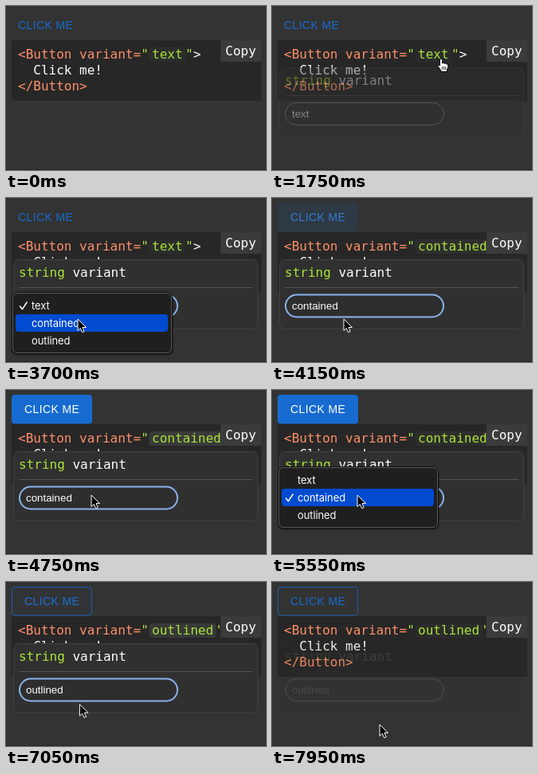
Write an HTML page that moves like this. It is 326 px wide and 206 px high and loops after 8000 ms.

```html
<!DOCTYPE html>
<html lang="en">
<head>
<meta charset="utf-8">
<title>Button playground</title>
<style>
  html, body { margin: 0; width: 100%; height: 100%; overflow: hidden; background: #333; }
  svg { display: block; }
  text { white-space: pre; }
  .mono { font: 16px "DejaVu Sans Mono", monospace; fill: #fff; }
  .tag { fill: #ff9068; }
  .str { fill: #abe338; }
  .label { font: 14px "Liberation Sans", Arial, sans-serif; letter-spacing: .4px; }
  .field { font: 13.33px "Liberation Sans", Arial, sans-serif; fill: #fff; }
  .menu text { font: 13px Inter, sans-serif; letter-spacing: -.1px; fill: #fff; }
</style>
</head>
<body>
<svg width="326" height="206" viewBox="0 0 326 206">
  <rect width="326" height="206" fill="#333"/>
  <rect y="205" width="326" height="1" fill="#262626"/>

  <rect id="btnShadow" x="7" y="8" width="101" height="36" rx="4" fill="#000"/>
  <rect id="btn" x="7" y="6" width="101" height="36.5" rx="4"/>
  <rect id="btnLine" x="7.5" y="6.5" width="100" height="35.5" rx="3.5" fill="none" stroke="#176bd0"/>
  <text id="btnText" class="label" y="29">CLICK ME</text>

  <rect x="7" y="43" width="313" height="76" fill="#272727"/>
  <rect id="chip" x="179.500" y="52" height="18" rx="4" fill="#fff"/>
  <g class="mono">
    <text x="15" y="66" class="tag">&lt;Button variant=<tspan class="str">"</tspan></text>
    <text id="value" x="183" y="66" class="str"></text>
    <text id="tail" y="66"><tspan class="str">"</tspan>&gt;</text>
    <text x="34.300" y="86">Click me!</text>
    <text x="15" y="106" class="tag">&lt;/Button&gt;</text>
    <rect x="269" y="43" width="51" height="27" fill="#3b3b3b"/>
    <rect x="320" y="43" width="6" height="27" fill="#333"/>
    <text x="275" y="62">Copy</text>
  </g>

  <g id="popup">
    <rect x="9.500" y="77.500" width="306" height="87" rx="7" fill="#303030" stroke="#424242"/>
    <text x="16" y="99" class="mono"><tspan class="str">string</tspan> variant</text>
    <path d="M16 112.500H309" stroke="#555"/>
    <rect id="select" y="121.500" height="28" rx="14" fill="#2e2e2e"/>
    <text id="fieldText" class="field" x="25" y="140"></text>
  </g>

  <g id="menu" class="menu">
    <rect x="7" y="1" width="203" height="78" rx="7" fill="#000" opacity=".3"/>
    <rect x="7.500" y="-.5" width="201" height="77" rx="6.500" fill="#1f1f1f" stroke="#0c0c0c"/>
    <rect x="8.500" y=".5" width="199" height="75" rx="5.500" fill="none" stroke="#5b5b5b"/>
    <rect id="hot" x="12" width="191" height="22" rx="4" fill="#004bd0"/>
    <path id="tick" d="M17.500 5.500l3 3.700 5.700-8.700" fill="none" stroke="#fff" stroke-width="1.500" stroke-linecap="round" stroke-linejoin="round"/>
  </g>

  <g id="cursor" stroke-linejoin="round">
    <path id="arrow" d="M0 0V14.500L3.300 11.500 5.600 16.700 8.200 15.600 6 10.500H10.500Z" fill="#000" stroke="#fff"/>
    <g id="hand">
      <path d="M-1.500 1Q0-1 1.500 1V6Q3 4.800 4.300 6.200 5.800 5.400 6.700 6.900 8.800 6.400 8.900 8.700 9 12 7.300 14V16.500H-.2V14.800L-4 9.700Q-4.300 7.200-1.500 9Z" fill="#fff" stroke="#000"/>
      <path d="M1.700 10V14M3.700 10V14M5.700 10V14" stroke="#000" stroke-width=".8"/>
    </g>
  </g>
</svg>
<script>
const LOOP = 8000;
const CHAR = 9.632;
const OPTIONS = ['text', 'contained', 'outlined'];
const BLUE = [23, 107, 208];
const CHANGES = [4105, 6850];   // when a new option takes effect
const MENUS = [                 // open, close, top edge
  [2950, 4050, 119],
  [5350, 6750, 97]
];
const POPUP = [1680, 1855, 7780, 7970];
const PATH = [                  // time, x, y of the cursor tip
  [1000, 228, 208], [1620, 212, 66], [1850, 212, 66], [2600, 120, 132],
  [3550, 107, 133], [3700, 90, 152], [4180, 90, 152], [4380, 107, 132],
  [5600, 107, 132], [6080, 91, 153], [6950, 91, 153], [7750, 123, 168],
  [7950, 135, 179], [8000, 137, 181]
];

const el = {};
document.querySelectorAll('[id]').forEach(n => el[n.id] = n);

const set = (node, attrs) => {
  for (const k in attrs) node.setAttribute(k, attrs[k]);
};
const show = (node, on) => node.setAttribute('visibility', on ? 'visible' : 'hidden');
const clamp = v => Math.min(1, Math.max(0, v));
const ramp = (t, a, b) => clamp((t - a) / (b - a));
const smooth = p => p * p * (3 - 2 * p);
const mix = (a, b, p) => a + (b - a) * p;

// cubic-bezier(.4, 0, .2, 1)
function standard(x) {
  let lo = 0, hi = 1;
  for (let i = 0; i < 18; i++) {
    const s = (lo + hi) / 2, r = 1 - s;
    if (1.2 * r * r * s + .6 * r * s * s + s ** 3 < x) lo = s; else hi = s;
  }
  return smooth(lo);
}

const rows = OPTIONS.map((name, i) => {
  const row = document.createElementNS('http://www.w3.org/2000/svg', 'text');
  row.textContent = name;
  set(row, { x: 32, y: 20.5 + 22 * i });
  return el.menu.appendChild(row);
});

function cursorAt(t) {
  const i = Math.max(1, PATH.findIndex(k => k[0] > t));
  const [t0, x0, y0] = PATH[i - 1], [t1, x1, y1] = PATH[i];
  const p = smooth(ramp(t, t0, t1));
  return [mix(x0, x1, p), mix(y0, y1, p)];
}

function drawButton(t, pick) {
  const [a, b] = CHANGES.map(c => standard(ramp(t, c, c + 250)));
  const fill = a * (1 - b);
  const ink = BLUE.map(c => Math.round(mix(c, 255, fill)));
  set(el.btn, { fill: `rgb(${BLUE})`, 'fill-opacity': fill });
  set(el.btnShadow, { opacity: .25 * fill });
  set(el.btnLine, { opacity: .8 * b });
  set(el.btnText, { x: pick ? 23 : 15, fill: `rgb(${ink})` });
}

function drawCode(t, word) {
  const width = word.length * CHAR;
  const pulse = .5 + .5 * Math.cos(Math.PI * (t - 800) / 1000);
  el.value.textContent = word;
  set(el.tail, { x: 186.5 + width });
  set(el.chip, { width: width + 7, 'fill-opacity': .02 + .07 * pulse });
}

function drawPopup(t, word) {
  const focus = t >= MENUS[0][0];
  const [a, b, c, d] = POPUP;
  set(el.popup, { opacity: ramp(t, a, b) * (1 - ramp(t, c, d)) });
  set(el.select, {
    x: focus ? 17 : 16.5,
    width: focus ? 198 : 199,
    stroke: focus ? '#8ab4ee' : '#8a8a8a',
    'stroke-width': focus ? 2 : 1
  });
  el.fieldText.textContent = word;
}

function drawMenu(t, pick, y) {
  const menu = MENUS.find(m => t >= m[0] && t < m[1]);
  show(el.menu, menu);
  if (!menu) return;
  const top = menu[2];
  const hot = Math.min(2, Math.max(0, Math.floor((y - top - 5) / 22)));
  set(el.menu, { transform: `translate(0 ${top})`, opacity: 1 - ramp(t, menu[1] - 80, menu[1]) });
  set(el.hot, { y: 5 + 22 * hot });
  set(el.tick, { transform: `translate(0 ${11.5 + 22 * pick})` });
}

function draw(t) {
  const pick = CHANGES.filter(c => t >= c).length;
  const [x, y] = cursorAt(t);
  const onChip = t > 1500 && t < 2200 && y < 71;
  drawButton(t, pick);
  drawCode(t, OPTIONS[pick]);
  drawPopup(t, OPTIONS[pick]);
  drawMenu(t, pick, y);
  show(el.cursor, t >= 1000);
  set(el.cursor, { transform: `translate(${x.toFixed(2)} ${y.toFixed(2)})` });
  set(el.arrow, { opacity: onChip ? 0 : 1 });
  set(el.hand, { opacity: onChip ? 1 : 0 });
}

const start = performance.now();
function tick(now) {
  draw(Math.max(0, now - start) % LOOP);
  requestAnimationFrame(tick);
}
draw(0);
requestAnimationFrame(tick);
</script>
</body>
</html>
```
